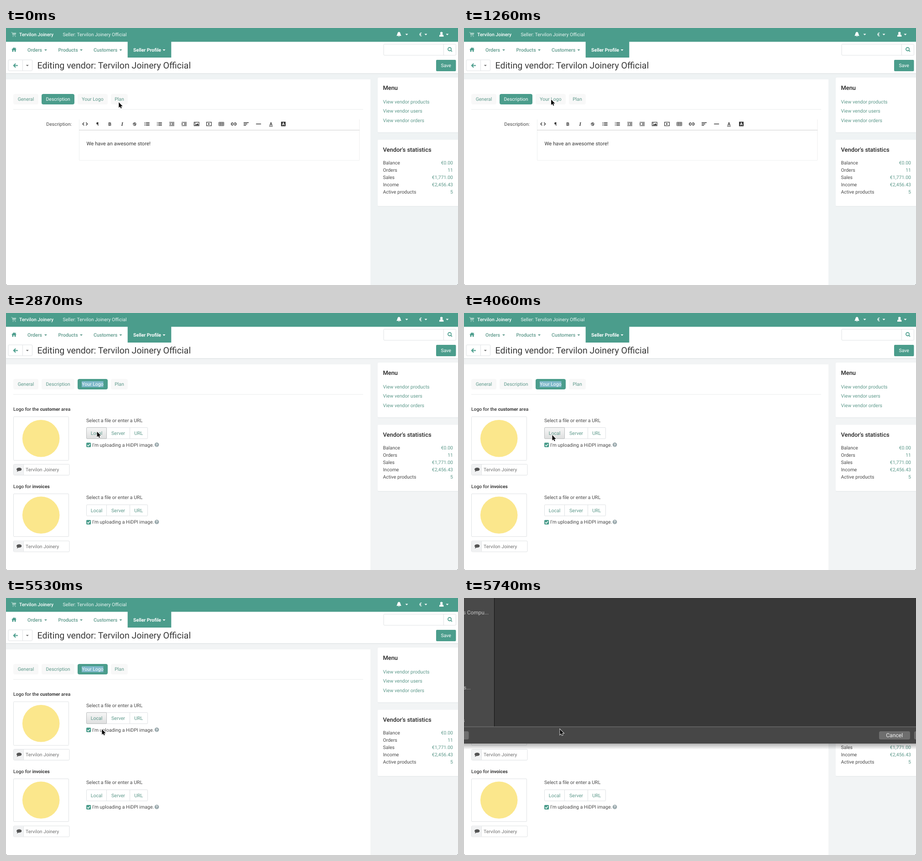
Recreate the animation shown at these times as an HTML page with a canvas. Size 991 px wide and 565 px high, loop 5810 ms.

```html
<!DOCTYPE html>
<html lang="en">
<head>
<meta charset="utf-8">
<title>Vendor profile</title>
<style>
html, body { margin: 0; width: 100%; height: 100%; overflow: hidden; background: #fff; }
canvas { display: block; width: 991px; height: 565px; }
</style>
</head>
<body>
<canvas id="stage" width="991" height="565"></canvas>
<script>
const ctx = document.getElementById('stage').getContext('2d');
const W = 991, H = 565, LOOP = 5810, STEP = 70;
const SHOP = 'Tervilon Joinery';
const GREEN = '#4b9d8c', LINK = '#5d998b', INK = '#4a4a4a', DARK = '#383838', LINE = '#dfe2e4';
const SWITCH_AT = 1400, WORD_AT = 1610, ALL_AT = 1890, HOT_AT = 2450, SHEET_AT = 5530;

// time, x, y of the pointer tip
const POINTER = [
  [0, 247.3, 163.3], [560, 191, 157.3], [1330, 191, 157.3], [1400, 192.3, 156.3], [1960, 192.3, 156.3],
  [2590, 199.6, 260.8], [3290, 199.6, 260.8], [3920, 193.4, 268.3], [4550, 193.4, 268.3], [5040, 210.3, 288.5]
];

// y is the middle of the capital letters
function text(str, x, y, { size = 10.5, color = INK, weight = 400, align = 'left', style = '', family = 'Roboto, sans-serif' } = {}) {
  ctx.font = `${style} ${weight} ${size}px ${family}`;
  ctx.textAlign = align;
  ctx.fillStyle = color;
  ctx.fillText(str, x, y + size * 0.355);
  return ctx.measureText(str).width;
}

function rect(x, y, w, h, fill) {
  ctx.fillStyle = fill;
  ctx.fillRect(x, y, w, h);
}

function box(x, y, w, h, r, fill, stroke) {
  ctx.beginPath();
  ctx.roundRect(x, y, w, h, r);
  if (fill) { ctx.fillStyle = fill; ctx.fill(); }
  if (stroke) { ctx.strokeStyle = stroke; ctx.lineWidth = 1; ctx.stroke(); }
}

function disc(x, y, r, color) {
  ctx.beginPath();
  ctx.arc(x, y, r, 0, Math.PI * 2);
  ctx.fillStyle = color;
  ctx.fill();
}

function icon(d, x, y, color, stroke = 0) {
  const path = new Path2D(d);
  ctx.save();
  ctx.translate(x, y);
  if (stroke) {
    ctx.lineWidth = stroke;
    ctx.strokeStyle = color;
    ctx.stroke(path);
  } else {
    ctx.fillStyle = color;
    ctx.fill(path);
  }
  ctx.restore();
}

const caret = (x, y, color) => icon('M-3-1.5H3L0 1.7Z', x, y, color);

function topBar() {
  rect(0, 0, W, 30.3, GREEN);
  const cart = '#a5d0c6';
  icon('M-5.5-4H-3.5L-2 2.5H4M-3-2.5H5L4 .6H-2.4Z', 17, 13.5, cart, 1);
  icon('M-3-2.5H5L4 .6H-2.4Z', 17, 13.5, cart);
  disc(15.5, 18.3, 1.1, cart);
  disc(20.5, 18.3, 1.1, cart);
  text(SHOP, 29, 14, { color: '#fff', weight: 500 });
  text(`Seller: ${SHOP} Official`, 124.5, 14, { color: '#eaf5f2' });
  icon('M0-5.5C4-4.5 2.5-1 5 2.5V3.3H-5V2.5C-2.5-1-4-4.5 0-5.5ZM-1.5 4H1.5Q0 6-1.5 4Z', 861.5, 14, '#fff');
  text('€', 909, 14, { size: 11, color: '#fff', align: 'center', weight: 500 });
  disc(954.7, 11.3, 2.7, '#fff');
  icon('M-4.7 5V3Q-4 0-2 0H2Q4 0 4.7 3V5Z', 954.7, 14, '#fff');
  for (const x of [878.5, 920.5, 967.5]) caret(x, 14.3, '#fff');
}

function navigation() {
  rect(0, 30.3, W, 70, '#fff');
  icon('M-5.5 0 0-5 2.7-2.5V-4.3H4V-1.4L5.5 0H4V4.7H1.2V1.3H-1.2V4.7H-4V0Z', 17.5, 47.5, GREEN);
  rect(266.7, 30, 95.6, 35, GREEN);
  const items = [['Orders', 47, 87], ['Products', 114.5, 165], ['Customers', 192, 251.5]];
  for (const [label, x, arrow] of items) {
    text(label, x, 48, { size: 10.7, color: LINK, weight: 500 });
    caret(arrow, 48.5, LINK);
  }
  text('Seller Profile', 279, 48, { color: '#fff', weight: 700 });
  caret(346.5, 48.5, '#fff');

  box(828, 35.5, 158.5, 24.5, 2, '#fff', LINE);
  rect(959, 36, 1, 24, LINE);
  icon('M3.2 0A3.6 3.6 0 1 1-4 0A3.6 3.6 0 1 1 3.2 0M2 2.4 5 5.4', 973, 46.5, GREEN, 1.7);

  box(5, 70, 52.5, 24, 2, '#fff', LINE);
  rect(36, 70.5, 1, 23.5, LINE);
  icon('M5 0H-4M0-4.2-4.2 0 0 4.2', 21, 82.5, GREEN, 2);
  caret(46.8, 82.5, '#777');
  text(`Editing vendor: ${SHOP} Official`, 68.5, 82.3, { size: 19.6, color: DARK });
  box(943, 70, 43.5, 25, 2, GREEN);
  text('Save', 964.7, 82.5, { color: '#fff', align: 'center' });
}

function card(y, h, title, titleY) {
  box(815, y, 180, h + 1.2, 2, '#e4e8ea');
  box(815, y, 180, h, 2, '#fff');
  text(title, 826.5, titleY, { size: 12.9, color: '#222', weight: 500 });
}

function sidebar() {
  card(109, 120.5, 'Menu', 131);
  ['products', 'users', 'orders'].forEach((kind, i) =>
    text(`View vendor ${kind}`, 826.5, 161.8 + i * 20.5, { size: 10.6, color: LINK }));
  card(245.5, 146, "Vendor's statistics", 267.5);
  const rows = [['Balance', '€0.00'], ['Orders', '11'], ['Sales', '€1,771.00'], ['Income', '€2,456.43'], ['Active products', '5']];
  rows.forEach(([label, value], i) => {
    const y = 296 + i * 16;
    text(label, 826.5, y);
    text(value, 980, y, { color: LINK, align: 'right' });
  });
}

function tabs(active, t) {
  const items = [['General', 16, 55], ['Description', 78, 72], ['Your Logo', 157, 66], ['Plan', 230, 37]];
  for (const [label, x, w] of items) {
    const on = label === active;
    box(x, 145, w, 23, 4, on ? GREEN : '#f8f8f8');
    if (on && t >= WORD_AT) {
      const from = t >= ALL_AT ? 166 : 190;
      rect(from, 150, 213.5 - from, 13, '#7fb9cb');
    }
    text(label, x + w / 2, 156.5, { color: on ? '#fff' : LINK, align: 'center' });
  }
  rect(16, 178.5, 767, 1, '#e9ebec');
}

function toolbar(y) {
  const at = i => 173.3 + i * 27.17;
  const glyph = (str, i, more) => text(str, at(i), y, { size: 10.5, color: DARK, weight: 700, align: 'center', ...more });
  const lined = (d, i, width = 1.3) => icon(d, at(i), y, DARK, width);
  const solid = (d, i) => icon(d, at(i), y, DARK);
  const list = 'M-2.5-3H5.5M-2.5 0H5.5M-2.5 3H5.5';
  const indent = 'M-5.5-3.7H5.5M-.5-1.2H5.5M-.5 1.2H5.5M-5.5 3.7H5.5';

  lined('M-2-3.2-5.2 0-2 3.2M2-3.2 5.2 0 2 3.2', 0, 1.5);
  glyph('¶', 1, { size: 11 });
  glyph('B', 2);
  glyph('I', 3, { style: 'italic', family: '"Liberation Serif", serif', size: 11.5 });
  glyph('S', 4);
  lined('M-4.5 0H4.5', 4, 1);
  lined(list, 5, 1.5);
  lined('M-5.5-3H-3.8M-5.5 0H-3.8M-5.5 3H-3.8', 5, 1.7);
  lined(list, 6);
  lined('M-4.6-4.2V-1.8M-4.6-.9V1M-4.6 1.8V4.2', 6, 1);
  lined(indent, 7);
  solid('M-5.5 0-2.3-2.2V2.2Z', 7);
  lined(indent, 8);
  solid('M-2.3 0-5.5-2.2V2.2Z', 8);
  lined('M-5.4-3.8H5.4V3.8H-5.4Z', 9, 1.2);
  solid('M-4.2 2.8-2 0-.6 1.2 2-1.6 4.2 1V2.8ZM-4-2.6H-2.2V-.8H-4Z', 9);
  lined('M-5.4-3.8H5.4V3.8H-5.4Z', 10, 1.2);
  solid('M-1.6-2.2 2.2 0-1.6 2.2Z', 10);
  lined('M-5.4-3.8H5.4V3.8H-5.4ZM-5.4-1.4H5.4M-5.4 1.2H5.4M-1.8-3.8V3.8M1.8-3.8V3.8', 11, 1);
  lined('M-1-2.6H-2.8A2.6 2.6 0 0 0-2.8 2.6H-1M1-2.6H2.8A2.6 2.6 0 0 1 2.8 2.6H1M-2.4 0H2.4', 12, 1.5);
  lined('M-5.5-3H5.5M-5.5 0H2.5M-5.5 3H0', 13, 1.5);
  lined('M-5.5 0H5.5', 14, 1.5);
  glyph('A', 15, { size: 9.5 });
  lined('M-4 4.7H4', 15, 1.3);
  box(at(16) - 5, y - 5, 10, 10, 0.5, DARK);
  glyph('A', 16, { size: 9, color: '#fff' });
}

function descriptionPane() {
  text('Description:', 144, 211.7, { align: 'right' });
  box(160.5, 199.5, 614.5, 91.5, 1, '#fff', '#eeefef');
  rect(159, 197, 618, 4, '#fff');
  rect(160, 224, 615, 1, '#cfcfcf');
  toolbar(211);
  text('We have an awesome store!', 176.5, 254, { size: 11.3, color: DARK });
}

function uploader(headingY, boxY, boxH, fieldY, words, hot) {
  let x = 16;
  for (const [word, weight] of words) x += text(word, x, headingY, { size: 10.3, weight, color: DARK });

  box(16.5, boxY + 0.5, 121, boxH, 1.5, '#fff', LINE);
  disc(76.7, boxY + boxH / 2 + 0.3, 40.8, '#fbe78c');

  box(16.5, fieldY + 0.5, 122.5, 24, 2, '#fff', LINE);
  rect(17, fieldY + 1, 21, 23, '#f1f2f3');
  rect(38, fieldY + 1, 1, 23, '#e4e6e7');
  icon('M0-4.3C7.6-4.3 7.6 3 0 3H-1.5Q-3 4.8-5 4.8Q-4 3.5-4 2C-7.4-.5-5-4.3 0-4.3Z', 28.7, fieldY + 12.3, '#555');
  text(SHOP, 43, fieldY + 12.5, { size: 10.4, color: '#707070' });

  const top = headingY + 40.3;
  text('Select a file or enter a URL', 176, headingY + 24.3, { size: 10.6 });
  box(176.5, top, 134, 24.5, 1.5, '#fff', LINE);
  rect(220, top, 1, 24.5, LINE);
  rect(271, top, 1, 24.5, LINE);
  if (hot) {
    const shade = ctx.createLinearGradient(0, top, 0, top + 24.5);
    shade.addColorStop(0, '#f7f7f7');
    shade.addColorStop(1, '#dedfdf');
    box(176.5, top, 44, 24.5, 1.5, shade, '#b9bcbd');
  }
  [['Local', 198.5], ['Server', 246], ['URL', 290.7]].forEach(([label, cx]) =>
    text(label, cx, top + 12.6, { size: 10.6, color: LINK, align: 'center' }));

  const checkY = headingY + 78.3;
  box(176, checkY - 4.7, 10.3, 10, 2, GREEN);
  icon('M-3 .2-.8 2.4 3.2-2.2', 181.1, checkY + 0.3, '#fff', 1.5);
  text("I'm uploading a HiDPI image.", 189, checkY, { size: 10.6 });
  disc(330.6, checkY - 0.2, 4.8, '#9aa9ad');
  text('?', 330.6, checkY - 0.1, { size: 8, color: '#fff', weight: 700, align: 'center' });
}

function logoPane(t) {
  uploader(211.5, 227.5, 96, 332, [['Logo for the ', 500], ['customer', 600], [' area', 500]], t >= HOT_AT);
  uploader(381.3, 397, 94, 500.5, [['Logo for ', 500], ['invoices', 600]], false);
}

function fileSheet(bottom) {
  ctx.save();
  ctx.translate(0, bottom - 320);
  const shadow = ctx.createLinearGradient(0, 320, 0, 333);
  shadow.addColorStop(0, 'rgba(0,0,0,.3)');
  shadow.addColorStop(1, 'rgba(0,0,0,0)');
  rect(0, 320, W, 13, shadow);
  rect(0, 0, W, 283, '#383838');
  rect(0, 0, 66, 283, '#494949');
  rect(66, 0, 1, 283, '#121212');
  rect(0, 283, W, 37, '#474747');
  rect(0, 282.5, W, 1.2, '#747474');
  const label = { size: 11.8, color: '#c6c6c6', align: 'right' };
  text('n’s Compu...', 54, 32, label);
  text('s...', 14.5, 196.5, label);
  text('s', 1.5, 268.5, label);
  for (const [x, w] of [[-40, 50.5], [910, 68], [987, 60]]) box(x, 293, w, 18, 3.5, '#6e6e6e');
  text('Cancel', 943.7, 302, { size: 12.2, color: '#f2f2f2', align: 'center' });
  ctx.restore();
}

function pointerAt(t) {
  const next = POINTER.findIndex(([time]) => time > t);
  if (next < 0) return POINTER[POINTER.length - 1].slice(1);
  const [t0, x0, y0] = POINTER[next - 1], [t1, x1, y1] = POINTER[next];
  const u = (t - t0) / (t1 - t0), k = u * u * (3 - 2 * u);
  return [x0 + (x1 - x0) * k, y0 + (y1 - y0) * k];
}

function pointer(t) {
  const [x, y] = pointerAt(t);
  const arrow = 'M0 0V12L2.7 9.5 4.5 13.5 6.4 12.6 4.7 8.7H8.4Z';
  icon(arrow, x, y, '#fff', 1.6);
  icon(arrow, x, y, '#0a0a0a');
}

function draw(t) {
  const logo = t >= SWITCH_AT;
  ctx.textRendering = 'geometricPrecision';
  rect(0, 0, W, H, logo ? '#f2f4f5' : '#eff3f4');
  navigation();
  topBar();
  rect(0, 99.5, W, 1.5, '#e0e4e6');
  rect(0, 113, 799, H - 113, '#fff');
  sidebar();
  tabs(logo ? 'Your Logo' : 'Description', t);
  if (logo) logoPane(t);
  else descriptionPane();
  icon('M0 0V-3Q0 0 3 0Z', 0, H, '#777');
  icon('M0 0V-3Q0 0-3 0Z', W, H, '#777');
  if (t > SHEET_AT) fileSheet(320 * (t - SHEET_AT) / 210);
  pointer(t);
}

const start = performance.now();
function tick() {
  const t = (performance.now() - start) % LOOP;
  draw(Math.floor(t / STEP) * STEP);
  requestAnimationFrame(tick);
}
tick();
</script>
</body>
</html>
```
